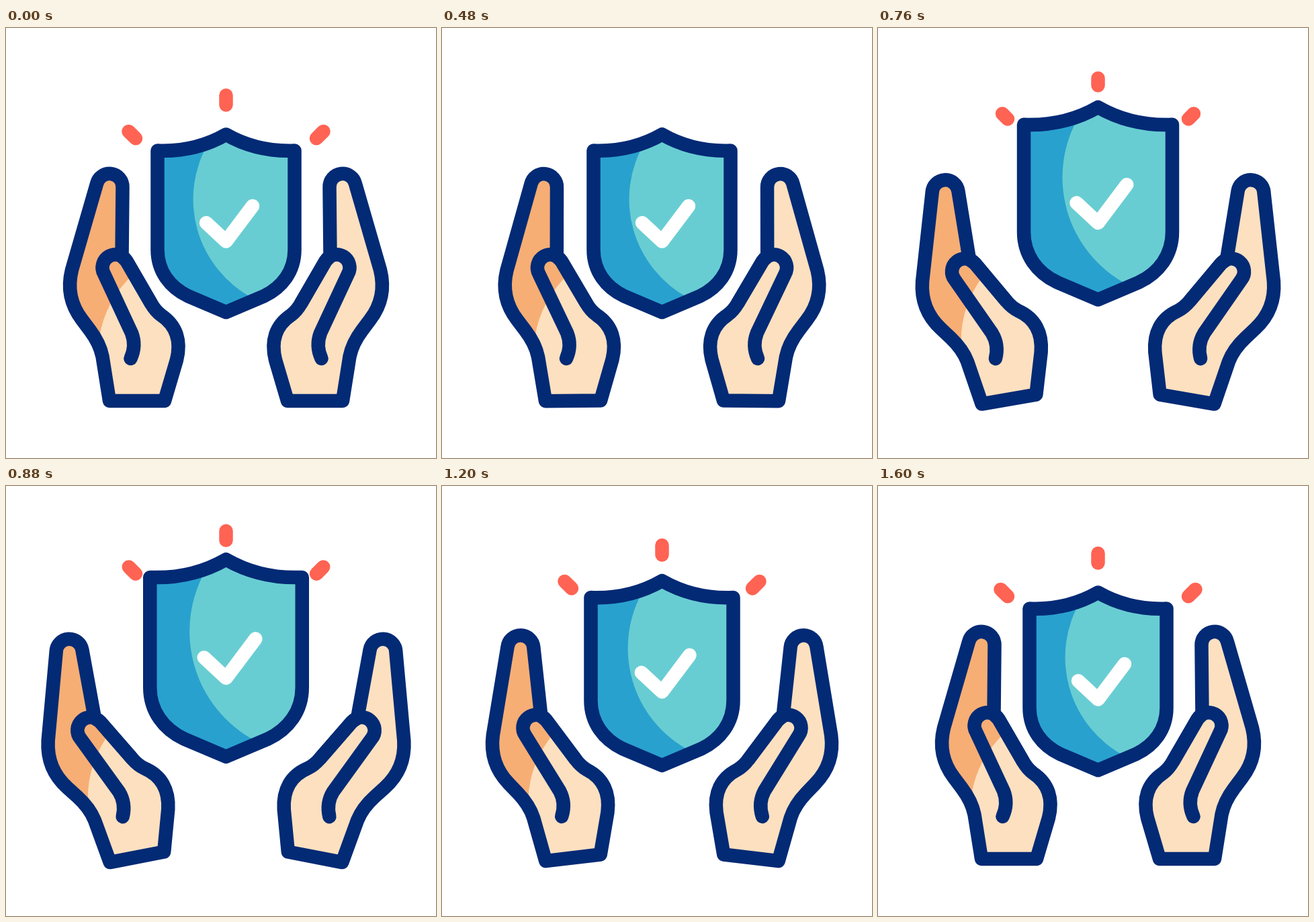
An HTML page with a canvas that plays this animation: 640 px wide and 640 px high, repeating every 1680 ms.

```html
<!DOCTYPE html>
<html lang="en">
<head>
<meta charset="utf-8">
<title>Protected</title>
<style>
  html, body { margin: 0; width: 100%; height: 100%; overflow: hidden; background: #fff; }
  canvas { display: block; width: 640px; height: 640px; }
</style>
</head>
<body>
<canvas id="stage" width="640" height="640"></canvas>
<script>
const ctx = document.getElementById('stage').getContext('2d');
const LOOP = 1680;
const AXIS = 327.5;
const STROKE = 20.5;
const WRIST = { x: 181, y: 554 };
const NAVY = '#032a75', SKIN = '#fde0bf', ORANGE = '#f6ae74';
const TEAL = '#68cdd2', BLUE = '#29a1ce', RED = '#ff6353';

const hand = new Path2D(`M154 555 L143.5 489 C140.5 474 134 462 125 450 L113 434
  C97 413 91 388 98 360 L135 232 A19.5 19.5 0 0 1 173.5 237 L172.5 340
  L179.5 347 L216 410 C220 417 225 423 231 427.5 C254 443 261 466 254 494 L236 555 Z`);
const thumb = new Path2D(`M185.5 492 C191 480 192 467 187 454 L146 366
  A19 19 0 0 1 179.5 347 L216 410`);
const handShade = new Path2D('M139 460 Q148 405 190 366 V190 H60 V460 Z');
const shield = new Path2D(`M327.5 158.5 C297 176 262 184 225.5 182.5 V330
  C225.5 362 244 386 271 399 L327.5 423 L384 399
  C411 386 429.5 362 429.5 330 V182.5 C393 184 358 176 327.5 158.5 Z`);
const shieldShade = new Path2D('M302 170 A166 166 0 0 0 367.4 402 L327 430 H215 V170 Z');
const check = new Path2D('M298 290 L327.5 317.5 L367 265');

// Ease curve: cubic bezier (.48, 0, .26, 1), solved by bisection.
function ease(u) {
  if (u <= 0) return 0;
  if (u >= 1) return 1;
  let lo = 0, hi = 1;
  for (let i = 0; i < 24; i++) {
    const s = (lo + hi) / 2, r = 1 - s;
    if (1.44 * s * r * r + 0.78 * s * s * r + s * s * s < u) lo = s; else hi = s;
  }
  return lo * lo * (3 - 2 * lo);
}

const ramp = (t, start, end) => ease((t - start) / (end - start));

function stroke(path, color) {
  ctx.strokeStyle = color;
  ctx.stroke(path);
}

function fillShaded(path, color, shade, shadeColor) {
  ctx.fillStyle = color;
  ctx.fill(path);
  if (!shade) return;
  ctx.save();
  ctx.clip(path);
  ctx.fillStyle = shadeColor;
  ctx.fill(shade);
  ctx.restore();
}

function mirror() {
  ctx.translate(2 * AXIS, 0);
  ctx.scale(-1, 1);
}

function drawHand(angle, mirrored) {
  ctx.save();
  if (mirrored) mirror();
  ctx.translate(WRIST.x, WRIST.y);
  ctx.rotate(-angle * Math.PI / 180);
  ctx.translate(-WRIST.x, -WRIST.y);
  fillShaded(hand, SKIN, mirrored ? null : handShade, ORANGE);
  stroke(hand, NAVY);
  stroke(thumb, NAVY);
  ctx.restore();
}

// The shield grows while its line weight stays the same.
function drawShield(lift, scale) {
  ctx.save();
  ctx.translate(AXIS, 300 - lift);
  ctx.scale(scale, scale);
  ctx.translate(-AXIS, -300);
  ctx.lineWidth = STROKE / scale;
  fillShaded(shield, TEAL, shieldShade, BLUE);
  stroke(shield, NAVY);
  stroke(check, '#fff');
  ctx.restore();
}

// Draws the part of a ray between two fractions, measured from its inner end.
function drawRay(x, y, dx, dy, from, to) {
  ctx.beginPath();
  ctx.moveTo(x + dx * from, y + dy * from);
  ctx.lineTo(x + dx * to, y + dy * to);
  ctx.strokeStyle = RED;
  ctx.stroke();
}

function drawRays(lift, from, to) {
  if (to - from < 0.002) return;
  ctx.save();
  ctx.translate(0, -lift);
  drawRay(AXIS, 114.5, 0, -14.3, from, to);
  drawRay(193, 164.3, -10.5, -10.4, from, to);
  mirror();
  drawRay(193, 164.3, -10.5, -10.4, from, to);
  ctx.restore();
}

function draw(t) {
  const fall = ramp(t, 955, 1480);
  const angle = 11.1 * (ramp(t, 398, 960) - ramp(t, 975, 1600));
  const lift = 34.2 * (ramp(t, 470, 955) - fall);
  const scale = 1 + 0.113 * (ramp(t, 555, 955) - fall);

  ctx.fillStyle = '#fff';
  ctx.fillRect(0, 0, 640, 640);
  ctx.lineWidth = STROKE;
  ctx.lineCap = ctx.lineJoin = 'round';

  drawHand(angle, false);
  drawHand(angle, true);
  drawShield(lift, scale);
  if (t < 480) drawRays(lift, ramp(t, 0, 400), 1);
  else drawRays(lift, 0, ramp(t, 540, 960));
}

function tick() {
  draw(performance.now() % LOOP);
  requestAnimationFrame(tick);
}
tick();
</script>
</body>
</html>
```
